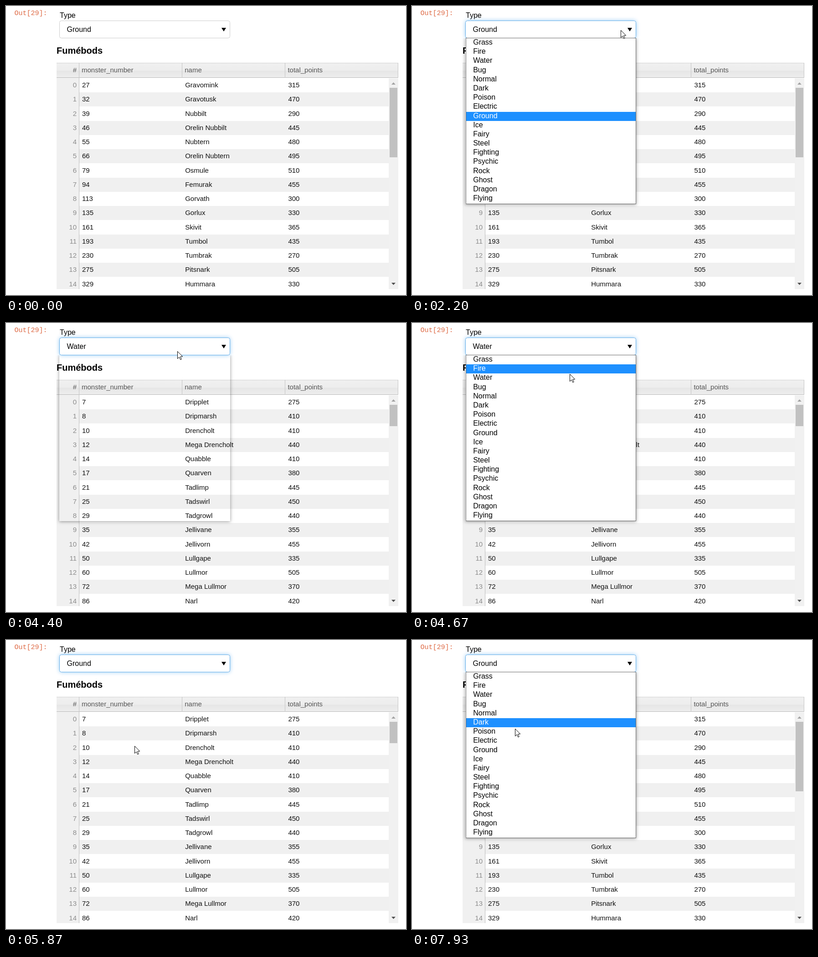
Write an HTML page with a canvas that moves like this. It is 878x636 px and loops after 8000 ms.

```html
<!DOCTYPE html>
<html lang="en">
<head>
<meta charset="utf-8">
<title>Type filter</title>
<style>
html, body { margin: 0; width: 100%; height: 100%; overflow: hidden; background: #fff; }
canvas { display: block; width: 878px; height: 636px; }
</style>
</head>
<body>
<canvas id="stage" width="878" height="636"></canvas>
<script>
const ctx = document.getElementById('stage').getContext('2d');
const SANS = '"Liberation Sans", Arial, sans-serif';
const LOOP = 8000, ROW_H = 31.25, ITEM_H = 20.19, LIST_TOP = 71;

const types = ('Grass Fire Water Bug Normal Dark Poison Electric Ground Ice Fairy Steel ' +
  'Fighting Psychic Rock Ghost Dragon Flying').split(' ');

function random(seed) {
  return () => (seed = (seed * 16807) % 2147483647) / 2147483647;
}

// Ids grow from first to last, points vary in steps of five
function makeTable(names, first, last, thumb) {
  const rnd = random(first * 977);
  const rows = names.split(',').map((name, i, all) => [
    Math.round(first * (last / first) ** (i / (all.length - 1))),
    name,
    265 + 5 * Math.floor(rnd() * 50)
  ]);
  return { rows, thumb };
}

const tables = {
  Ground: makeTable('Gravomink,Gravotusk,Nubbilt,Orelin Nubbilt,Nubtern,Orelin Nubtern,' +
    'Osmule,Femurak,Gorvath,Gorlux,Skivit,Tumbol,Tumbrak,Pitsnark,Hummara', 27, 329, 153),
  Water: makeTable('Dripplet,Dripmarsh,Drencholt,Mega Drencholt,Quabble,Quarven,Tadlimp,' +
    'Tadswirl,Tadgrowl,Jellivane,Jellivorn,Lullgape,Lullmor,Mega Lullmor,Narl', 7, 86, 47)
};

// Times are in ticks, 15 per second
const sessions = [
  { fade: 33, open: 33, pick: 46, load: 50, type: 'Water' },
  { fade: 66, open: 67, pick: 87, load: 101, type: 'Ground' },
  { fade: 113, open: 115, pick: Infinity, load: Infinity }
];

// Pointer moves: [from, to, x, y]
const moves = [
  [21, 27, 520, 38], [27, 29, 458, 53], [35, 41, 377, 120], [54, 56, 395, 120],
  [59, 62, 376, 62], [67, 75, 282, 220], [79, 80, 282, 233], [100, 113, 282, 43],
  [115, 119, 226, 195]
];

const ease = u => u * u * (3 - 2 * u);
const clamp = u => Math.max(0, Math.min(1, u));

function pointerAt(k) {
  return moves.reduce(([px, py], [from, to, x, y]) => {
    const u = ease(clamp((k - from) / (to - from)));
    return [px + (x - px) * u, py + (y - py) * u];
  }, [824, 88]);
}

function lastType(k, key) {
  return sessions.reduce((type, s) => k >= s[key] ? s.type : type, 'Ground');
}

function popupAt(k) {
  const s = sessions.find(s => k >= s.fade && k <= s.pick);
  if (!s) return 'closed';
  return k >= s.open && k < s.pick ? 'open' : 'shadow';
}

function rect(x, y, w, h, color) {
  ctx.fillStyle = color;
  ctx.fillRect(x, y, w, h);
}

function text(str, x, y, size, color, align = 'left', weight = '', family = SANS) {
  ctx.font = `${weight} ${size}px ${family}`;
  ctx.fillStyle = color;
  ctx.textAlign = align;
  ctx.fillText(str, x, y);
}

function poly(points, color) {
  ctx.beginPath();
  points.forEach(([x, y]) => ctx.lineTo(x, y));
  ctx.closePath();
  ctx.fillStyle = color;
  ctx.fill();
}

// Triangle with a flat side at y and its tip h below (or above)
const arrow = (x, y, w, h, color) => poly([[x - w / 2, y], [x + w / 2, y], [x, y + h]], color);

function shadow(color, blur, dy = 0) {
  ctx.shadowColor = color;
  ctx.shadowBlur = blur;
  ctx.shadowOffsetY = dy;
}

function drawSelect(choice, focused) {
  ctx.save();
  ctx.beginPath();
  ctx.roundRect(117.5, 32.5, 374, 38, 4);
  ctx.fillStyle = '#fff';
  if (focused) shadow('rgba(82,168,236,.65)', 10);
  ctx.fill();
  shadow('transparent', 0);
  ctx.strokeStyle = focused ? '#66afe9' : '#ccc';
  ctx.stroke();
  ctx.restore();
  text(choice, 133.5, 57, 16, '#000');
  arrow(478, 48, 10, 8, '#000');
}

function drawHeader() {
  const g = ctx.createLinearGradient(0, 125, 0, 158);
  g.addColorStop(0, '#f0f0f0');
  g.addColorStop(.52, '#ededed');
  g.addColorStop(.54, '#e6e6e6');
  g.addColorStop(1, '#eeeeee');
  rect(111, 125, 750, 33, g);
  rect(111, 125, 750, 1, '#d3d3d3');
  rect(111, 157, 750, 1, '#b8b8b8');
  for (const x of [160, 386, 612, 860]) rect(x, 125, 1, 33, '#c4c4c4');
  text('#', 155, 146, 15, '#555', 'right');
  ['monster_number', 'name', 'total_points'].forEach((label, i) =>
    text(label, 166 + 226.2 * i, 146, 15, '#555'));
}

function drawTable({ rows, thumb }) {
  rect(111, 158, 49, 465, '#f0f0f0');
  rows.forEach((cells, i) => {
    const top = Math.round(158.75 + ROW_H * i);
    const bottom = Math.min(623, Math.round(158.75 + ROW_H * (i + 1)));
    const base = 179 + Math.round(ROW_H * i);
    if (i % 2) rect(161, top, 679, bottom - top, '#f0f0f0');
    text(i, 155, base, 15, '#8c8c8c', 'right');
    cells.forEach((cell, c) => text(cell, 167 + 226.2 * c, base, 15, '#111'));
  });
  rect(160, 158, 1, 465, '#bdbdbd');
  rect(840, 159, 21, 464, '#f1f1f1');
  rect(842, 180, 17, thumb, '#c1c1c1');
  arrow(850.5, 173, 9, -5, '#a3a3a3');
  arrow(850.5, 609, 9, 5, '#505050');
}

// Shadow around the list, leaving its inside clear
function drawListShadow() {
  ctx.save();
  ctx.beginPath();
  ctx.rect(100, 71, 410, 390);
  ctx.rect(117, 71, 375, 365);
  ctx.clip('evenodd');
  shadow('rgba(0,0,0,.42)', 7, 1);
  rect(117, 71, 375, 365, '#000');
  ctx.restore();
}

function drawList(active) {
  rect(118, 70, 374, 366, '#6b6b6b');
  rect(119, 71, 372, 364, '#fff');
  types.forEach((name, i) => {
    const top = Math.round(LIST_TOP + ITEM_H * i);
    const on = i === active;
    if (on) rect(119, top, 372, Math.round(LIST_TOP + ITEM_H * (i + 1)) - top, '#1e90ff');
    text(name, 134.2, 85 + Math.round(ITEM_H * i), 16, on ? '#fff' : '#000');
  });
}

function drawPointer(x, y) {
  ctx.save();
  ctx.translate(Math.round(x) + .5, Math.round(y) + .5);
  poly([[0, 0], [0, 16], [3.7, 12.6], [6.4, 18.3], [8.7, 17.3], [6.2, 11.6], [11.2, 11.4]], '#fff');
  ctx.strokeStyle = '#000';
  ctx.stroke();
  ctx.restore();
}

function draw(t) {
  const k = Math.floor(t * .015 + .06);
  const popup = popupAt(k);
  const choice = lastType(k, 'pick');

  rect(0, 0, 878, 636, '#fff');
  text('Out[29]:', 18.5, 19.5, 15, '#de6a45', 'left', '', '"Liberation Mono", monospace');
  text('Type', 118, 26, 16, '#000');
  text('Fumébods', 111, 105, 20, '#000', 'left', 'bold');
  drawHeader();
  drawTable(tables[lastType(k, 'load')]);
  drawSelect(choice, k >= sessions[0].open);

  if (popup !== 'closed') drawListShadow();
  if (popup === 'open') {
    // The highlight trails the pointer by half a tick
    const y = pointerAt(k - .5)[1];
    drawList(y > LIST_TOP ? Math.floor((y - LIST_TOP) / ITEM_H) : types.indexOf(choice));
  }
  if (k >= moves[0][0]) drawPointer(...pointerAt(k));
}

const start = performance.now();
function tick() {
  draw((performance.now() - start) % LOOP);
  requestAnimationFrame(tick);
}
tick();
</script>
</body>
</html>
```
